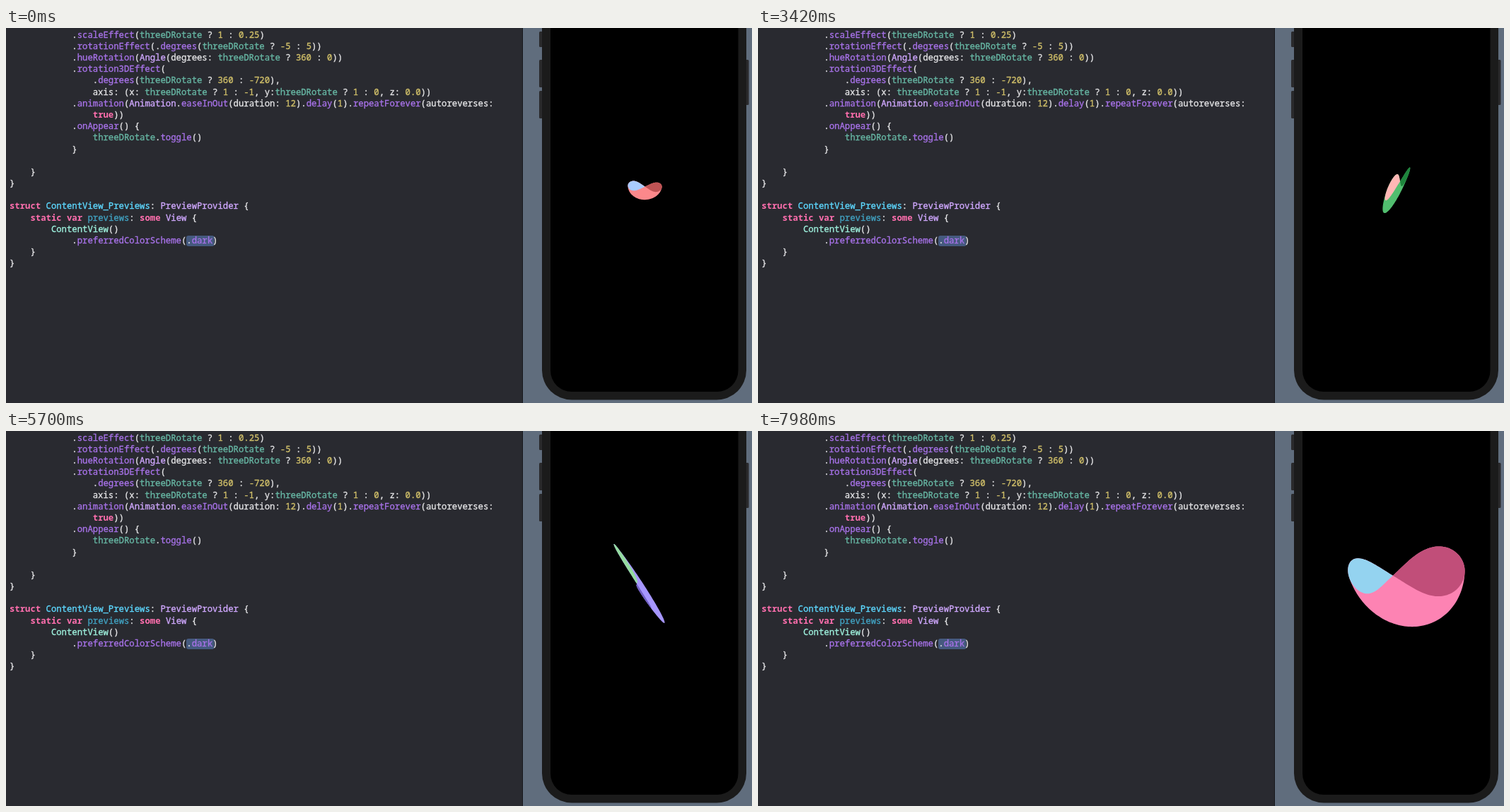
These frames come from a looping animation (1055 px wide and 531 px high, 8 s). An HTML page:

```html
<!DOCTYPE html>
<html lang="en">
<head>
<meta charset="utf-8">
<title>3D rotation preview</title>
<style>
  html, body { margin: 0; width: 100%; height: 100%; overflow: hidden; background: #292a30; }
  svg { display: block; }
  text {
    font: 500 12.28px "Noto Sans Mono", "DejaVu Sans Mono", monospace;
    color: #e4e4e6;
    white-space: pre;
  }
  text, tspan { fill: currentColor; stroke: currentColor; stroke-width: .35px; }
  .own { color: #67b7a4; }
  .key { color: #ff6fae; font-weight: 700; stroke: none; }
  .type { color: #d0a8ff; }
  .decl { color: #5dd8ff; }
  .view { color: #9ef1dd; }
  .prop { color: #41a1c0; }
  .func { color: #a772e8; }
  .num { color: #d0bf69; }
</style>
</head>
<body>
<svg width="1055" height="531" viewBox="0 0 1055 531">
  <rect width="1055" height="531" fill="#292a30"/>
  <rect x="255" y="294" width="39.5" height="15" rx="3" fill="#455a7f"/>
  <g id="code"></g>

  <rect x="730" width="1" height="531" fill="#15161a"/>
  <rect x="731" width="324" height="531" fill="#606d7d"/>
  <g fill="#2a2a2c">
    <rect x="754" y="5" width="6" height="22" rx="1.5"/>
    <rect x="754" y="45" width="6" height="39" rx="1.5"/>
    <rect x="754" y="89" width="6" height="39" rx="1.5"/>
    <rect x="1045" y="45" width="5.5" height="64" rx="1.5"/>
  </g>
  <rect x="758" y="-80" width="289" height="606.5" rx="42" fill="#1b1b1b"/>
  <rect x="770" y="-80" width="265.5" height="595" rx="30" fill="#000"/>

  <g id="shape">
    <path id="body" fill="#ff859e"/>
    <path id="light" fill="#9ecffa"/>
    <path id="dark" fill="#c25066"/>
  </g>
</svg>
<script>
const $ = id => document.getElementById(id);

// Code listing
const source = `
            .scaleEffect(threeDRotate ? 1 : 0.25)
            .rotationEffect(.degrees(threeDRotate ? -5 : 5))
            .hueRotation(Angle(degrees: threeDRotate ? 360 : 0))
            .rotation3DEffect(
                .degrees(threeDRotate ? 360 : -720),
                axis: (x: threeDRotate ? 1 : -1, y:threeDRotate ? 1 : 0, z: 0.0))
            .animation(Animation.easeInOut(duration: 12).delay(1).repeatForever(autoreverses:
                true))
            .onAppear() {
                threeDRotate.toggle()
            }

    }
}

struct ContentView_Previews: PreviewProvider {
    static var previews: some View {
        ContentView()
            .preferredColorScheme(.dark)
    }
}`.slice(1);

const token = new RegExp([
  '(?<own>threeDRotate)',
  '\\b(?<key>struct|static|var|some|true)\\b',
  '\\b(?<type>Animation|Angle|PreviewProvider|View)\\b',
  '(?<decl>ContentView_Previews)',
  '(?<view>ContentView)',
  '(?<prop>previews)',
  '(?<=\\.)(?<func>[a-z]\\w*)',
  '(?<num>-?\\b\\d[\\d.]*)'
].join('|'), 'g');

function paint(line) {
  return line.replace(token, (word, ...rest) => {
    const groups = rest[rest.length - 1];
    const kind = Object.keys(groups).find(k => groups[k] !== undefined);
    return `<tspan class="${kind}">${word}</tspan>`;
  });
}

$('code').innerHTML = source.split('\n')
  .map((line, i) => `<text x="5" y="${(13.7 + i * 16.18).toFixed(2)}">${paint(line)}</text>`)
  .join('');

// Flat shape: a half disc under two mirrored drops that meet at its centre
const RADIUS = 85.5, MID = -28, STEPS = 24;
const edge = [
  [[0, 0], [20, 13], [38, 29], [57, 29]],
  [[57, 29], [73, 29], [RADIUS, 16], [RADIUS, 0]]
];

function cubic(p, t, axis) {
  const u = 1 - t;
  return u * u * u * p[0][axis] + 3 * u * u * t * p[1][axis]
       + 3 * u * t * t * p[2][axis] + t * t * t * p[3][axis];
}

function wave(sx, sy) {
  const pts = [];
  for (const seg of edge)
    for (let i = 0; i <= STEPS; i++)
      pts.push([sx * cubic(seg, i / STEPS, 0), MID + sy * cubic(seg, i / STEPS, 1)]);
  return pts;
}

const drop = side => [...wave(side, -1), ...wave(side, 1).reverse()];
const bowl = Array.from({ length: 81 }, (_, i) => {
  const a = Math.PI * i / 80;
  return [RADIUS * Math.cos(a), MID + RADIUS * Math.sin(a)];
});
const parts = {
  body: [...wave(-1, -1).reverse(), ...wave(1, -1), ...bowl],
  light: drop(-1),
  dark: drop(1)
};

// Motion
const LOOP = 8000, TICK = 30, LENGTH = 10800, OFFSET = 1392;
const CENTER = [903, 231], DEPTH = 172;
const rad = deg => deg * Math.PI / 180;
const mix = (a, b, p) => a + (b - a) * p;

// cubic-bezier(.42, 0, .58, 1)
function easeInOut(x) {
  let lo = 0, hi = 1;
  for (let i = 0; i < 30; i++) {
    const s = (lo + hi) / 2, u = 1 - s;
    if (1.26 * u * u * s + 1.74 * u * s * s + s * s * s < x) lo = s; else hi = s;
  }
  return lo * lo * (3 - 2 * lo);
}

function projector(p) {
  const scale = mix(0.25, 1, p);
  const spin = rad(mix(5, -5, p)), turn = rad(mix(-720, 360, p));
  const c = Math.cos(spin) * scale, s = Math.sin(spin) * scale;
  let ax = mix(-1, 1, p), ay = p;
  const len = Math.hypot(ax, ay);
  ax /= len;
  ay /= len;
  return ([x0, y0]) => {
    const x = x0 * c - y0 * s, y = x0 * s + y0 * c;
    const along = x * ax + y * ay, across = y * ax - x * ay;
    const f = DEPTH / (DEPTH - across * Math.sin(turn));
    const u = along * f, v = across * Math.cos(turn) * f;
    return [CENTER[0] + u * ax - v * ay, CENTER[1] + u * ay + v * ax];
  };
}

function draw(now) {
  const t = Math.floor(now % LOOP / TICK) * TICK;
  const p = easeInOut((t + OFFSET) / LENGTH);
  const project = projector(p);
  for (const id in parts) {
    const pts = parts[id].map(pt => project(pt).map(n => n.toFixed(2)).join(' '));
    $(id).setAttribute('d', `M${pts.join('L')}Z`);
  }
  $('shape').style.filter = `hue-rotate(${(360 * p).toFixed(2)}deg)`;
}

const start = performance.now();
function loop() {
  draw(performance.now() - start);
  requestAnimationFrame(loop);
}
loop();
</script>
</body>
</html>
```
